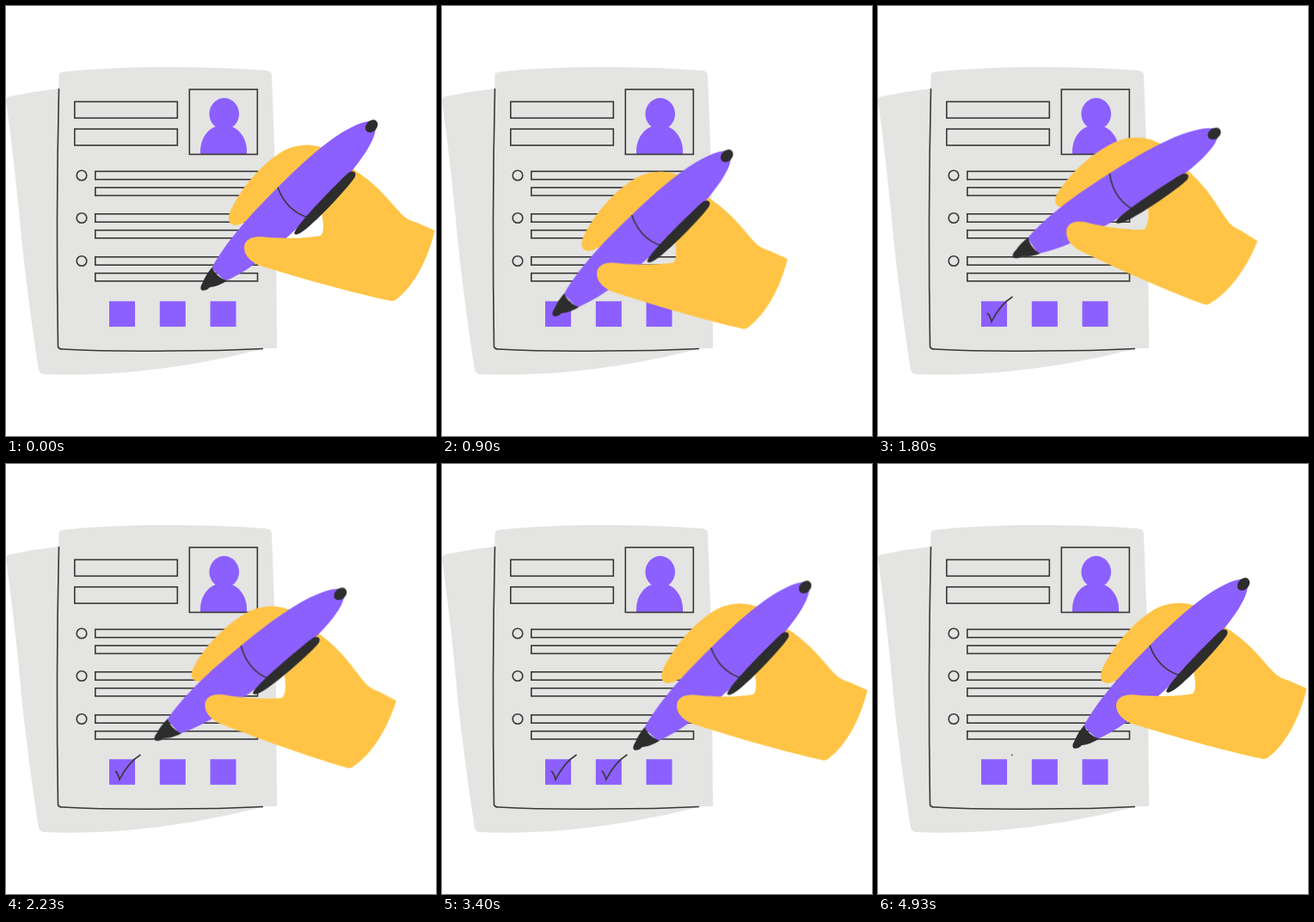
An HTML page without scripts for the animation above (5010 ms loop, 500 by 500 pixels).

```html
<!DOCTYPE html>
<html lang="en">
<head>
<meta charset="utf-8">
<title>Filling in a form</title>
<style>
  html, body { margin: 0; width: 100%; height: 100%; overflow: hidden; background: #fff; }
  svg { display: block; width: 100%; height: 100%; }

  .paper { fill: #e4e4e2; }
  .purple { fill: #8c5fff; }
  .skin { fill: #ffc445; }
  .dark { fill: #2d2d2d; }
  .line { fill: none; stroke: #373737; stroke-width: 1.6; }

  .hand, .pen, .tick { animation: 5.01s linear infinite; }
  .hand { animation-name: hand; transform-origin: 277px 282px; }
  .pen { animation-name: pen; transform-origin: 228px 329px; }
  .tick { stroke-linecap: butt; stroke-dasharray: 1 2; }
  .first { animation-name: first-tick; }
  .second { animation-name: second-tick; }

  @keyframes hand {
    0% { transform: translate(0, 0) rotate(0deg); animation-timing-function: cubic-bezier(.4, 0, .8, .75); }
    10.6% { transform: translate(-54px, 11px) rotate(.3deg); animation-timing-function: cubic-bezier(.25, .3, .7, 1); }
    18%, 18.8% { transform: translate(-97px, 30px) rotate(.8deg); }
    22.2% { transform: translate(-92px, 36px) rotate(1deg); }
    28.9% { transform: translate(-70px, 10px) rotate(1.5deg); animation-timing-function: ease-in-out; }
    35.9% { transform: translate(-58px, -20px) rotate(8.3deg); animation-timing-function: ease-in; }
    42.9% { transform: translate(-48px, -12px) rotate(5deg); animation-timing-function: ease-out; }
    52.9% { transform: translate(-39px, 29px) rotate(1.4deg); }
    53.9% { transform: translate(-36px, 33px) rotate(1.4deg); }
    55.7% { transform: translate(-33px, 36px) rotate(1.4deg); }
    62.5% { transform: translate(-13px, 10px) rotate(1deg); }
    67.9% { transform: translate(-4px, 0) rotate(.5deg); animation-timing-function: ease-out; }
    73.9%, 76.8% { transform: translate(0, 0) rotate(0deg); animation-timing-function: ease-in-out; }
    86.4% { transform: translate(-1px, 5px) rotate(-2.3deg); animation-timing-function: ease-in-out; }
    97.8%, 100% { transform: translate(0, 0) rotate(0deg); }
  }

  @keyframes pen {
    0% { transform: translate(0, 0) rotate(0deg); animation-timing-function: cubic-bezier(.4, 0, .8, .75); }
    10.6% { transform: translate(-54px, 11px) rotate(.5deg); animation-timing-function: cubic-bezier(.25, .3, .7, 1); }
    18%, 18.8% { transform: translate(-98px, 30px) rotate(1.3deg); }
    22.2% { transform: translate(-94px, 37px) rotate(1.5deg); }
    28.9% { transform: translate(-72px, 9px) rotate(2.2deg); animation-timing-function: ease-in-out; }
    35.9% { transform: translate(-70px, -38px) rotate(12.4deg); animation-timing-function: ease-in; }
    42.9% { transform: translate(-58px, -22px) rotate(7deg); animation-timing-function: ease-out; }
    52.9% { transform: translate(-42px, 29px) rotate(1.7deg); }
    53.9% { transform: translate(-39px, 33px) rotate(1.7deg); }
    55.7% { transform: translate(-36px, 37px) rotate(1.6deg); }
    62.5% { transform: translate(-14px, 9px) rotate(1deg); }
    67.9% { transform: translate(-4px, 2px) rotate(.4deg); animation-timing-function: ease-out; }
    73.9%, 76.8% { transform: translate(0, 0) rotate(0deg); animation-timing-function: ease-in-out; }
    86.4% { transform: translate(2px, 11px) rotate(-3deg); animation-timing-function: ease-in-out; }
    97.8%, 100% { transform: translate(0, 0) rotate(0deg); }
  }

  /* Ticks are drawn from their start and later wiped from their start */
  @keyframes first-tick {
    0%, 18.8% { stroke-dashoffset: 1.01; }
    22.2% { stroke-dashoffset: .77; }
    28.9%, 87.4% { stroke-dashoffset: 0; }
    98.4% { stroke-dashoffset: -.97; }
    99.2%, 100% { stroke-dashoffset: -1.01; }
  }
  @keyframes second-tick {
    0%, 52.9% { stroke-dashoffset: 1.01; }
    55.7% { stroke-dashoffset: .77; }
    62.5%, 87.4% { stroke-dashoffset: 0; }
    98%, 100% { stroke-dashoffset: -1.01; }
  }
</style>
</head>
<body>
<svg viewBox="0 0 500 500">
  <defs>
    <g id="item" class="line">
      <circle cx="88" cy="197" r="5.8"/>
      <rect x="103.8" y="192.3" width="188.7" height="9.4"/>
      <rect x="103.8" y="211.2" width="188.7" height="9.2"/>
    </g>
    <rect id="box" class="purple" x="120" y="343.3" width="30" height="29.6"/>
  </defs>

  <!-- Sheets -->
  <path class="paper" d="M0 110Q0 106 5 105Q34 99 62 96L298 399Q220 419 140 426Q85 430 43 428Q39 427 38 423Q28 360 19 280Q11 190 0 110Z"/>
  <path class="paper" d="M61.500 80Q62 77 67 76.500Q120 71 185 71Q250 71 303 75Q309 76 309 81Q313 170 314 260L315 398L61 399Q59 250 61.500 80Z"/>
  <path class="line" d="M61.500 96Q58 250 60.500 396Q61 399 66 399Q120 402 190 401Q250 401 299 398.500"/>

  <!-- Form -->
  <g class="line">
    <rect x="79.800" y="111.300" width="119.500" height="19"/>
    <rect x="79.800" y="143" width="119.500" height="19"/>
  </g>
  <ellipse class="purple" cx="253.700" cy="125.500" rx="17.300" ry="18.500"/>
  <path class="purple" d="M226 172C225 151 238 138.500 253 138.500S281 151 280 172Z"/>
  <rect class="line" x="213.300" y="97" width="79" height="75.500"/>
  <use href="#item"/>
  <use href="#item" y="49.500"/>
  <use href="#item" y="99.500"/>
  <use href="#box"/>
  <use href="#box" x="58.800"/>
  <use href="#box" x="117.500"/>
  <path class="line tick first" pathLength="1" d="M127 357Q130 359 132 367Q142 347 156.500 338"/>
  <path class="line tick second" pathLength="1" d="M185.800 357Q188.800 359 190.800 367Q200.800 347 215.300 338"/>

  <!-- Hand and pen -->
  <g class="hand">
    <path class="skin" d="M266 255C258 254 257 246 262 236C277 205 307 174 330 165Q350 158 370 165L407 192C432 208 446 227 459 241Q466 249 478 252L498.500 261C491 294 474 326 455 340Q451 344 446 342L360 300L366 268Q372 260 366 238L320 230L272 254Z"/>
  </g>
  <g class="pen">
    <path class="purple" d="M239 305C250 285 270 256 316 211C345 182 378 151 408 138Q421 133 428 134Q432 139 428 151C421 171 395 204 351 246C310 287 280 309 255 320Z"/>
    <path class="dark" d="M239.500 304Q244 315 257 319.500Q247 326 237 327Q232 332 227.500 330.500Q224.500 328 229 321Q232 313 239.500 304Z"/>
    <ellipse class="dark" cx="425" cy="139.700" rx="8.200" ry="6.300" transform="rotate(-47 425 139.700)"/>
    <path class="line" d="M316 211Q326 238 351 246"/>
    <path class="dark" d="M335.500 265C333 259 383 208 398 194C404 189.500 409 194 405 200C394 216 351 261 340 265Q337 266.500 335.500 265Z"/>
  </g>
  <g class="hand">
    <path class="skin" d="M277 281C277 271 287 267 300 268.500C325 271 350 270 366 267Q370 264 369 256L410 280L455 340Q451 344 446 342.500C400 333 345 317 302 304C286 300 277 291 277 281Z"/>
  </g>
</svg>
</body>
</html>
```
